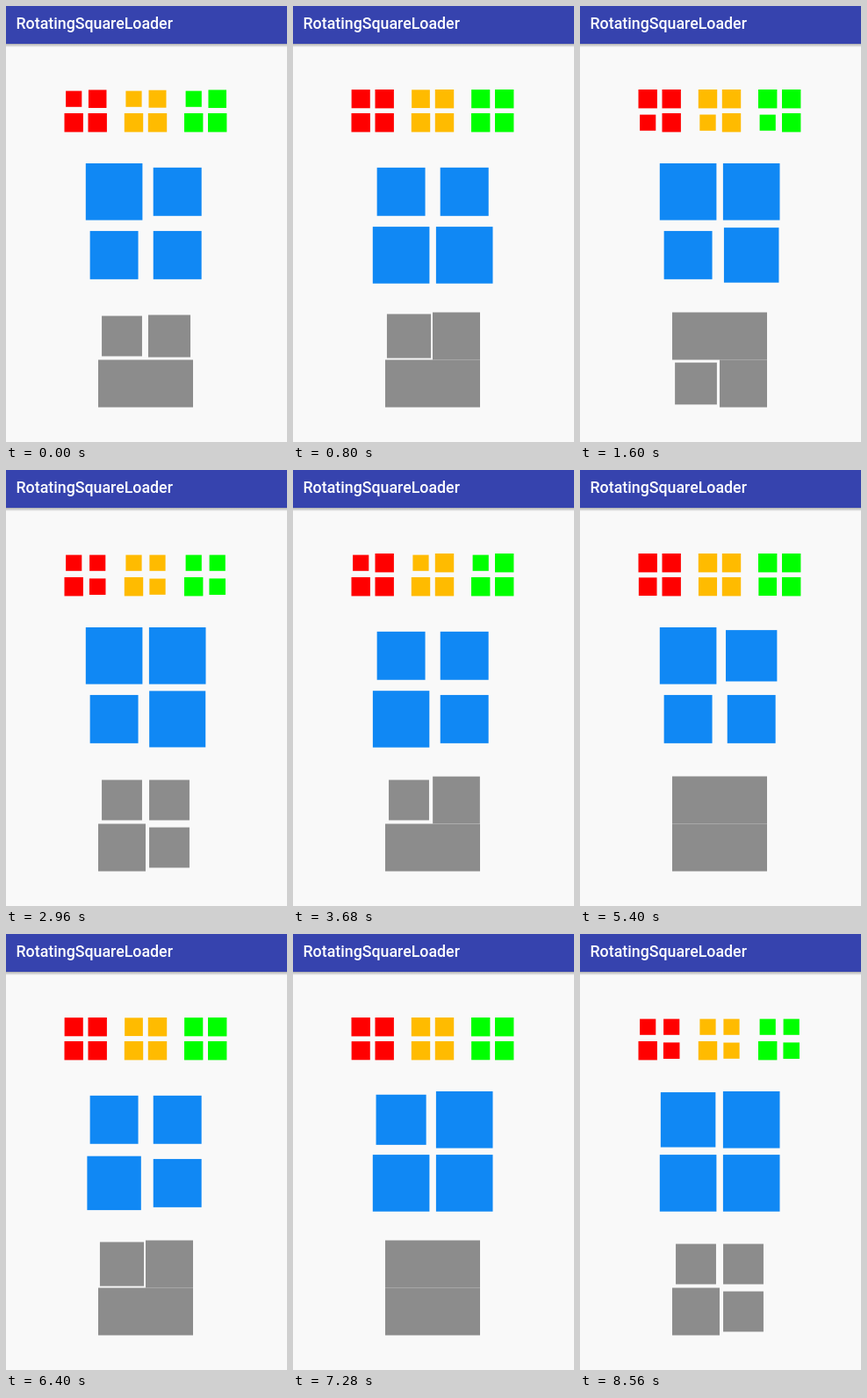
Recreate the animation shown at these times as an HTML page. Size 320x496 px, loop 8.6 s.

```html
<!DOCTYPE html>
<html lang="en">
<head>
<meta charset="utf-8">
<title>RotatingSquareLoader</title>
<style>
  html, body { margin: 0; width: 100%; height: 100%; overflow: hidden; background: #f9f9f9; }
  svg { display: block; }
  text { font: 500 17.8px Roboto, sans-serif; fill: #fff; }
</style>
</head>
<body>
<svg id="stage" width="320" height="496" viewBox="0 0 320 496">
  <defs>
    <linearGradient id="shade" x2="0" y2="1">
      <stop stop-color="#000" stop-opacity=".3"/>
      <stop offset="1" stop-color="#000" stop-opacity="0"/>
    </linearGradient>
  </defs>
  <rect width="320" height="43" fill="#3643ae"/>
  <rect y="43" width="320" height="4" fill="url(#shade)"/>
  <text x="11.5" y="25.7">RotatingSquareLoader</text>
</svg>
<script>
const LOOP = 8600, TICK = 40, MIN_SCALE = 0.85, PAUSE = 50 / 3;
const CORNERS = [[0, 0], [1, 0], [1, 1], [0, 1]];
const stage = document.getElementById('stage');

// step: ms per square; phase: position in the eight-step cycle at time 0
const loaders = [
  { x: 66.5, y: 95, size: 21.4, pitch: 27, color: '#f00', step: 116.67, phase: 1.3 },
  { x: 134.8, y: 95, size: 21.4, pitch: 27, color: '#fb0', step: 116.67, phase: 1.4 },
  { x: 203, y: 95, size: 21.4, pitch: 27, color: '#0f0', step: 116.67, phase: 1.3 },
  { x: 90.8, y: 179, size: 64.6, pitch: 72.1, color: '#1088f4', step: 167.1, phase: 5.05 },
  { x: 105, y: 348.5, size: 54, pitch: 54, color: '#8c8c8c', step: 116.67, phase: 1.56 }
];

for (const loader of loaders) {
  loader.squares = CORNERS.map(() => {
    const square = document.createElementNS(stage.namespaceURI, 'rect');
    square.setAttribute('fill', loader.color);
    return stage.appendChild(square);
  });
}

const ease = p => (1 - Math.cos(Math.PI * Math.max(0, Math.min(1, p)))) / 2;

function draw(time) {
  for (const { x, y, size, pitch, step, phase, squares } of loaders) {
    const cycle = (time / step + phase) % 8;
    const stretch = step / (step - PAUSE);
    squares.forEach((square, i) => {
      // Squares shrink in turn during steps 0-3 and grow back during 4-7.
      const shrunk = ease((cycle - i) * stretch) - ease((cycle - i - 4) * stretch);
      const side = size * (1 - (1 - MIN_SCALE) * shrunk);
      const inset = (size - side) / 2;
      square.setAttribute('x', x + CORNERS[i][0] * pitch + inset);
      square.setAttribute('y', y + CORNERS[i][1] * pitch + inset);
      square.setAttribute('width', side);
      square.setAttribute('height', side);
    });
  }
}

const start = performance.now();
function frame() {
  const time = (performance.now() - start) % LOOP;
  draw(Math.floor(time / TICK) * TICK);
  requestAnimationFrame(frame);
}
frame();
</script>
</body>
</html>
```
